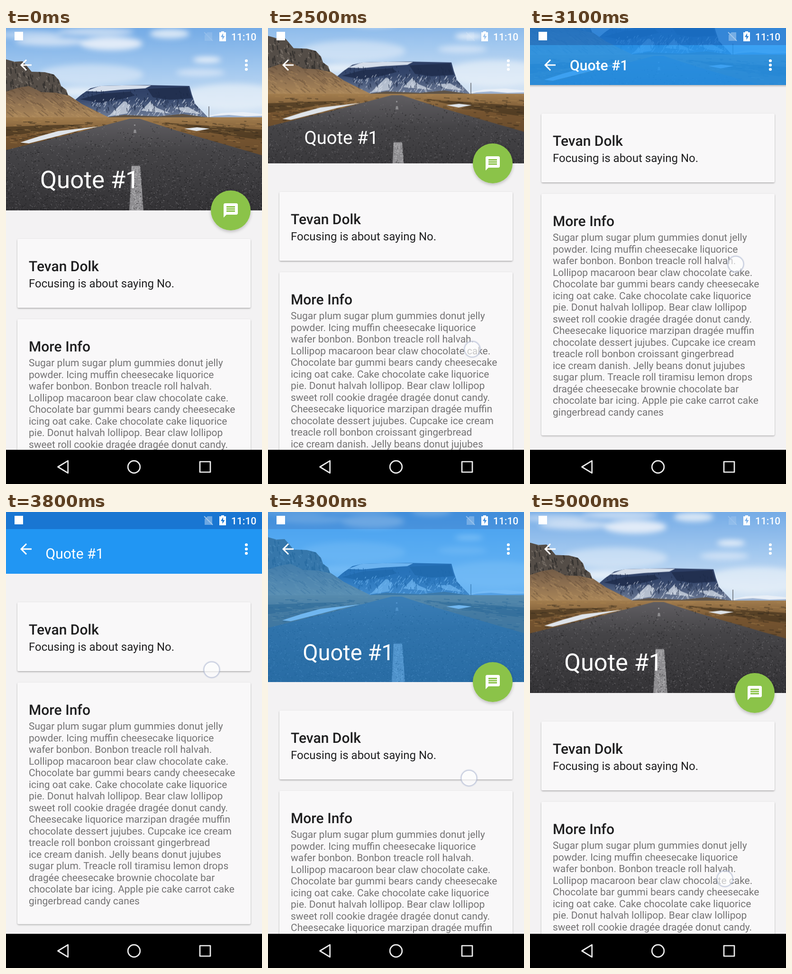
These frames come from a looping animation (540x960 px, 5.1 s). An HTML page:

```html
<!DOCTYPE html>
<html lang="en">
<head>
<meta charset="utf-8">
<title>Collapsing toolbar</title>
<style>
html, body { margin: 0; width: 100%; height: 100%; overflow: hidden; background: #000; }
svg { display: block; width: 540px; height: 960px; font-family: Roboto, sans-serif; text-rendering: geometricPrecision; }
</style>
</head>
<body>
<svg viewBox="0 0 540 960">
  <defs>
    <linearGradient id="sky" x1="0" y1="0" x2="0" y2="1">
      <stop offset="0" stop-color="#74abe6"/>
      <stop offset=".45" stop-color="#a2c8ef"/>
      <stop offset="1" stop-color="#d9e6f4"/>
    </linearGradient>
    <linearGradient id="road" x1="0" y1="0" x2="0" y2="1">
      <stop offset="0" stop-color="#605e62"/>
      <stop offset=".35" stop-color="#454447"/>
      <stop offset="1" stop-color="#343336"/>
    </linearGradient>
    <linearGradient id="slope" x1="0" y1="0" x2="0" y2="1">
      <stop offset="0" stop-color="#5f4e40"/>
      <stop offset=".55" stop-color="#8a6d4f"/>
      <stop offset="1" stop-color="#ab8759"/>
    </linearGradient>
    <linearGradient id="ground" x1="0" y1="0" x2="0" y2="1">
      <stop offset="0" stop-color="#a27d4e"/>
      <stop offset=".2" stop-color="#755430"/>
      <stop offset="1" stop-color="#4b3822"/>
    </linearGradient>
    <linearGradient id="mesa" x1="0" y1="0" x2="0" y2="1">
      <stop offset="0" stop-color="#2c3d64"/>
      <stop offset=".45" stop-color="#36486d"/>
      <stop offset="1" stop-color="#6e7c97"/>
    </linearGradient>
    <linearGradient id="fade" x1="0" y1="0" x2="0" y2="1">
      <stop offset="0" stop-opacity=".22"/>
      <stop offset="1" stop-opacity="0"/>
    </linearGradient>
    <filter id="soft" x="-20%" y="-60%" width="140%" height="220%"><feGaussianBlur stdDeviation="6"/></filter>
    <filter id="drop" x="-20%" y="-20%" width="140%" height="150%">
      <feDropShadow dx="0" dy="3" stdDeviation="3" flood-opacity=".22"/>
    </filter>
    <filter id="lift" x="-3%" y="-5%" width="106%" height="112%">
      <feDropShadow dx="0" dy="1.5" stdDeviation="1.4" flood-opacity=".32"/>
    </filter>
    <clipPath id="frame"><rect id="crop" width="540" height="384"/></clipPath>
    <clipPath id="block"><path d="M145 152L158 141 178 127 200 122 290 120 387 122 392 140 399 160 426 188H190z"/></clipPath>
    <clipPath id="rock"><path d="M0 66L18 71 35 70 44 80 54 92 82 93 101 98 112 110 116 122 127 130 131 142 104 136 75 135 48 122 24 126 0 134z"/></clipPath>
    <clipPath id="hill"><path d="M0 108L60 118 130 140 160 160 216 188H0z"/></clipPath>
  </defs>

  <rect width="540" height="960" fill="#f3f2f3"/>
  <g id="content" fill="#1f1f20">
    <g fill="#f9f8f9" filter="url(#lift)">
      <rect x="24" y="60" width="492" height="145" rx="3"/>
      <rect x="24" y="229" width="492" height="508.5" rx="3"/>
    </g>
    <g font-size="30" font-weight="500">
      <text x="48" y="128">Tevan Dolk</text>
      <text x="48" y="297">More Info</text>
    </g>
    <text x="48" y="162" font-size="24">Focusing is about saying No.</text>
    <g id="info" font-size="21" fill="#747374"></g>
  </g>

  <g clip-path="url(#frame)">
    <g id="photo" fill="none">
      <rect width="540" height="192" fill="url(#sky)"/>
      <g fill="#f1f5fb" filter="url(#soft)">
        <ellipse cx="50" cy="14" rx="70" ry="8" opacity=".5"/>
        <ellipse cx="95" cy="29" rx="75" ry="9" opacity=".65"/>
        <ellipse cx="222" cy="33" rx="66" ry="14" opacity=".85"/>
        <ellipse cx="190" cy="8" rx="80" ry="8" opacity=".65"/>
        <ellipse cx="345" cy="12" rx="42" ry="10" opacity=".8"/>
        <ellipse cx="424" cy="67" rx="30" ry="6" opacity=".95"/>
        <ellipse cx="410" cy="94" rx="52" ry="8" opacity=".55"/>
        <ellipse cx="180" cy="98" rx="110" ry="22" opacity=".45"/>
        <ellipse cx="160" cy="134" rx="60" ry="9" opacity=".8"/>
        <ellipse cx="480" cy="145" rx="110" ry="28" opacity=".6"/>
      </g>
      <path fill="#e9eff7" d="M415 188L455 179 500 177 540 181V190H415z"/>
      <path fill="#9db1cf" d="M420 189L440 185 470 183 505 186 540 185V190H420z"/>

      <g clip-path="url(#block)">
        <rect x="140" y="118" width="290" height="70" fill="url(#mesa)"/>
        <path fill="#d5deeb" d="M168 133L198 122 250 120 306 121 294 127 240 130 200 134z"/>
        <path fill="#223050" d="M156 150L200 138 262 134 272 142 250 148 200 158zM298 128L384 124 392 148 345 151 310 146z"/>
        <path fill="#ccd5e2" opacity=".8" d="M216 186L250 153 262 162 256 180zM285 174L304 155 318 168 348 180zM355 168L384 166 411 181 378 178z"/>
        <path id="snow" stroke="#dfe6f0" stroke-width="1.5" opacity=".6"/>
        <path id="cracks" stroke="#1d2a47" stroke-width="1.6" opacity=".65"/>
      </g>
      <path fill="#5e5347" d="M205 189L250 183 320 186 372 181 432 189z"/>

      <g clip-path="url(#hill)">
        <rect y="100" width="220" height="90" fill="url(#slope)"/>
        <path id="scree" stroke="#54412f" stroke-width="2" opacity=".35"/>
        <path id="grass" stroke="#c09b69" stroke-width="2" opacity=".35"/>
      </g>
      <g clip-path="url(#rock)">
        <rect y="60" width="140" height="90" fill="#544d47"/>
        <path id="chips" stroke="#8b8279" stroke-width="2.2" opacity=".55"/>
        <path id="gaps" stroke="#262324" stroke-width="2.4" opacity=".6"/>
      </g>

      <rect y="188" width="540" height="196" fill="url(#ground)"/>
      <path fill="#45341f" opacity=".7" d="M0 208L110 204 170 203 60 220 0 228zM330 199L400 204 540 214V236L440 222z"/>
      <path id="mud" stroke="#33281b" stroke-width="1.8" opacity=".5"/>
      <path id="straw" stroke="#b08850" stroke-width="1.6" opacity=".45"/>
      <path fill="#dfe4ea" d="M30 241L70 228 110 217 197 207 150 217 92 232 48 243zM376 212L403 209 430 212 402 217z"/>

      <path fill="url(#road)" d="M261 191H282L350 213 540 268V384H0V257L150 220z"/>
      <path fill="#8e8d90" d="M270 203h3v3h-3zM270 214h4l1 7h-6zM265 290H283L290 384H260z"/>
      <path id="dark" stroke="#1f1e21" stroke-width="1.7" opacity=".6"/>
      <path id="light" stroke="#87858a" stroke-width="1.4" opacity=".5"/>
      <path id="paint" stroke="#c4c3c5" stroke-width="2" opacity=".55"/>
      <path stroke="#54565b" stroke-width="1.3" d="M428 165V189"/>
    </g>
    <g id="scrim">
      <rect width="540" height="384" fill="#2196f3"/>
      <rect width="540" height="36" fill="#1976d2"/>
    </g>
    <text id="title" fill="#fff">Quote #1</text>
  </g>
  <rect id="edge" y="120" width="540" height="5" fill="url(#fade)"/>

  <g fill="#fff">
    <path transform="translate(24 60) scale(1.5)" d="M20 11H7.83l5.59-5.59L12 4l-8 8 8 8 1.41-1.41L7.83 13H20z"/>
    <circle cx="507" cy="69" r="3.1"/><circle cx="507" cy="78" r="3.1"/><circle cx="507" cy="87" r="3.1"/>
    <rect x="18" y="8" width="18" height="18"/>
    <g id="sim">
      <path d="M425 9H435V27H419V15z" opacity=".6"/>
      <path d="M418 9L436 27" stroke="#fff" stroke-width="1.8"/>
    </g>
    <path fill-rule="evenodd" d="M454 7h6v2h4v19h-14V9h4zM458 11l-5 8h3.5v6l5-8h-3.5z"/>
    <text x="475" y="26" font-size="21" font-weight="500">11:10</text>
  </g>

  <g id="fab">
    <circle r="42" fill="#8bc34a" filter="url(#drop)"/>
    <path transform="translate(-18 -18) scale(1.5)" fill="#fff" d="M20 2H4c-1.1 0-1.99.9-1.99 2L2 22l4-4h14c1.1 0 2-.9 2-2V4c0-1.1-.9-2-2-2zm-2 12H6v-2h12v2zm0-3H6V9h12v2zm0-3H6V6h12v2z"/>
  </g>
  <g id="touch">
    <circle r="17" fill="#fff" fill-opacity=".6" stroke="#8f9fc4" stroke-opacity=".2" stroke-width="3.5"/>
    <circle r="16.5" fill="none" stroke="#a3aecb" stroke-opacity=".5" stroke-width="1.5"/>
  </g>

  <rect y="888" width="540" height="72"/>
  <g fill="none" stroke="#ededed" stroke-width="2.7" stroke-linejoin="round">
    <path d="M130.7 911.2V936.8L109.5 924z"/>
    <circle cx="270" cy="924" r="12.8"/>
    <rect x="409" y="913" width="22" height="22"/>
  </g>
</svg>
<script>
const $ = id => document.getElementById(id);
const LOOP = 5100, OPEN = 384, SHUT = 120;
const clamp = (v, lo = 0, hi = 1) => Math.min(hi, Math.max(lo, v));
const mix = (a, b, k) => a + (b - a) * k;
const ramp = (t, from, to) => clamp((t - from) / (to - from));

const LINES = [
  'Sugar plum sugar plum gummies donut jelly',
  'powder. Icing muffin cheesecake liquorice',
  'wafer bonbon. Bonbon treacle roll halvah.',
  'Lollipop macaroon bear claw chocolate cake.',
  'Chocolate bar gummi bears candy cheesecake',
  'icing oat cake. Cake chocolate cake liquorice',
  'pie. Donut halvah lollipop. Bear claw lollipop',
  'sweet roll cookie dragée dragée donut candy.',
  'Cheesecake liquorice marzipan dragée muffin',
  'chocolate dessert jujubes. Cupcake ice cream',
  'treacle roll bonbon croissant gingerbread',
  'ice cream danish. Jelly beans donut jujubes',
  'sugar plum. Treacle roll tiramisu lemon drops',
  'dragée cheesecake brownie chocolate bar',
  'chocolate bar icing. Apple pie cake carrot cake',
  'gingerbread candy canes'
];
$('info').innerHTML = LINES.map((s, i) =>
  `<text x="48" y="${328 + i * 24.5}">${s}</text>`).join('');

// Seeded strokes give the landscape its grain
let seed = 7;
const rnd = () => (seed = seed * 16807 % 2147483647) / 2147483647;
const within = (x0, y0, x1, y1) => () => [mix(x0, x1, rnd()), mix(y0, y1, rnd())];
function scatter(id, count, spot, dx, dy) {
  let d = '';
  for (let i = 0; i < count; i++) {
    const [x, y] = spot(), size = 0.5 + rnd();
    d += `M${x.toFixed(1)} ${y.toFixed(1)}l${(dx * size).toFixed(1)} ${(dy * size).toFixed(1)}`;
  }
  $(id).setAttribute('d', d);
}
const onRoad = () => {
  const y = 205 + 179 * Math.sqrt(rnd()), k = (y - 190) / 66;
  return [mix(Math.max(0, 262 - 258 * k), Math.min(540, 282 + 200 * k), rnd()), y];
};
scatter('snow', 130, within(180, 146, 425, 187), -4, 6);
scatter('cracks', 120, within(150, 130, 410, 172), 1, 6);
scatter('scree', 130, within(0, 110, 200, 180), 9, 7);
scatter('grass', 90, within(0, 140, 215, 188), 9, 5);
scatter('chips', 90, within(0, 66, 130, 138), 3, 4);
scatter('gaps', 90, within(0, 70, 130, 142), 1, 8);
scatter('mud', 260, within(0, 196, 540, 262), 9, 0.5);
scatter('straw', 160, within(0, 190, 540, 250), 10, 0.5);
scatter('dark', 1500, onRoad, 1.8, 0.3);
scatter('light', 1100, onRoad, 1.6, 0.3);
scatter('paint', 130, within(264, 291, 285, 383), 2, 1);

// Monotone cubic through [time, value] keys
function track(keys, t) {
  const n = keys.length - 1;
  const slope = i => (keys[i + 1][1] - keys[i][1]) / (keys[i + 1][0] - keys[i][0]);
  const tangent = i => {
    if (i === 0) return slope(0);
    if (i === n) return slope(n - 1);
    const a = slope(i - 1), b = slope(i);
    return a * b <= 0 ? 0 : 2 * a * b / (a + b);
  };
  let i = 0;
  while (i < n - 1 && t > keys[i + 1][0]) i++;
  const [t0, v0] = keys[i], [t1, v1] = keys[i + 1];
  const w = t1 - t0, k = clamp((t - t0) / w), q = 1 - k;
  return v0 * q * q * (1 + 2 * k) + v1 * k * k * (3 - 2 * k)
    + w * k * q * (tangent(i) * q - tangent(i + 1) * k);
}
const FINGER_X = [[2200, 426], [2700, 433], [3100, 434], [3700, 434], [4100, 432], [4600, 411], [5000, 411]];
const FINGER_Y = [[2200, 777], [2700, 612], [3100, 497], [3700, 322], [4100, 432], [4600, 748], [4800, 775], [5000, 772]];

// The header follows the finger in half pixels; its grip changes at each stop
function headerAt(t, y) {
  if (t < 2200) return OPEN;
  const grip = t < 3700 ? mix(393.5, 390, ramp(t, 2200, 2700)) : t < 4850 ? 202 : 391;
  return Math.round(2 * clamp(y - grip, SHUT, OPEN)) / 2;
}
function scrimAt(t) {
  const out = ramp(t, 4060, 4600);
  return ramp(t, 2740, 3160) * (1 - out * out * (3 - 2 * out));
}
const fabAt = t => t < 3500 ? 1 - ramp(t, 2770, 2970) : ramp(t, 4085, 4285);

function draw(t) {
  const x = track(FINGER_X, t), y = track(FINGER_Y, t);
  const h = headerAt(t, y), f = (OPEN - h) / (OPEN - SHUT);
  const scrim = scrimAt(t), fab = fabAt(t);
  const set = (id, name, value) => $(id).setAttribute(name, value);

  set('content', 'transform', `translate(0 ${h})`);
  set('crop', 'height', h);
  set('photo', 'transform', `translate(0 ${(h - OPEN) / 2})`);
  set('scrim', 'opacity', scrim);
  set('edge', 'opacity', f === 1 ? 1 : 0);
  set('sim', 'opacity', mix(0.2, 0.6, scrim));

  set('title', 'x', mix(72, 84, f));
  set('title', 'y', mix(336.5, 88.5, f));
  set('title', 'font-size', mix(51, 30, 1 - (1 - f) ** 2));
  set('title', 'font-weight', f === 1 ? 500 : 400);

  set('fab', 'transform', `translate(474 ${h}) scale(${fab})`);
  set('fab', 'opacity', fab);
  set('touch', 'transform', `translate(${x} ${y})`);
  set('touch', 'opacity', t < 2200 ? 0 : 1);
}

// The picture holds at first, then steps ten times a second
let last = -1;
function tick(now) {
  const t = now % LOOP, step = t < 2200 ? 0 : Math.floor(t / 100) * 100;
  if (step !== last) draw(last = step);
  requestAnimationFrame(tick);
}
draw(0);
requestAnimationFrame(tick);
</script>
</body>
</html>
```
